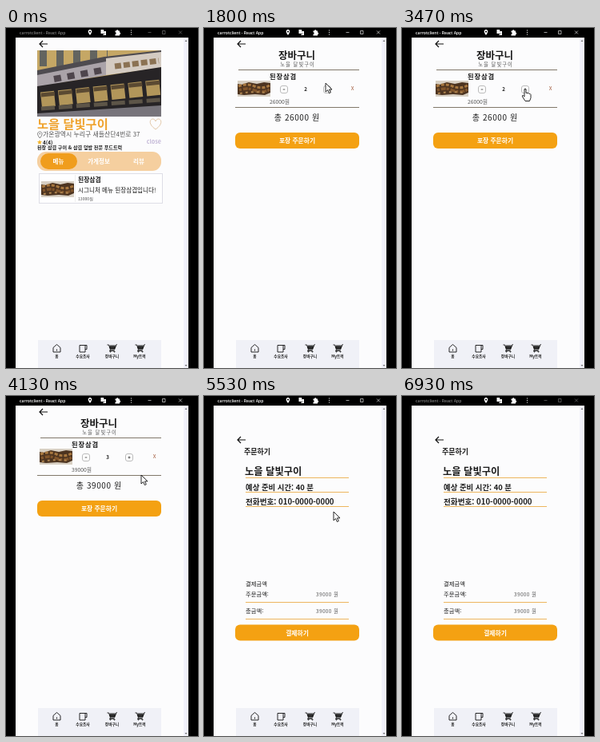
Recreate the animation shown at these times as an HTML page. Size 240x426 px, loop 6990 ms.

```html
<!DOCTYPE html>
<html lang="ko">
<head>
<meta charset="utf-8">
<title>Order demo</title>
<style>
html, body { margin: 0; width: 100%; height: 100%; overflow: hidden; background: #000; }
svg { display: block; width: 100%; height: 100%; }
text { font-family: "Noto Sans CJK KR", "Noto Sans CJK", sans-serif; fill: #1c1c1c; }
.b { font-weight: 700; }
.h { font-weight: 900; fill: #fff; }
.c { text-anchor: middle; }
.thin { font-weight: 300; fill: #555; }
.line { fill: none; stroke: #111; stroke-width: .9; }
.rule { stroke: #edb65e; stroke-width: 1; }
</style>
</head>
<body>
<svg viewBox="0 0 240 426">
  <defs>
    <path id="back" d="M52 20H42m4-4-4 4 4 4" fill="none" stroke="#111" stroke-width="1.200"/>
    <g id="food">
      <path fill="#4d3420" d="M0 0h41v20H0z"/>
      <path fill="#d8d0c4" d="M0 0h41v3l-8-1-9 2-10-2-9 3-5-1zM0 17l8 1 14-1 12 1 7-3v5H0z"/>
      <path d="M1 7q10-4 20 0t19-1" fill="none" stroke="#a87840" stroke-width="3" stroke-dasharray="4 2"/>
      <path d="M2 12q9-4 19 0t19-1" fill="none" stroke="#81552b" stroke-width="3.500" stroke-dasharray="3 2 6 1"/>
      <path d="M3 16q12-3 34-1" fill="none" stroke="#b08550" stroke-width="2" stroke-dasharray="3 4"/>
    </g>
    <g id="cart" class="line">
      <path d="M-5-4h2l2 6h5l2-5h-8"/>
      <path d="M-2-2h7l-1 3h-5z" fill="#333"/>
      <path d="m6-3 1-2M-1 2l-1 1.500h6"/>
      <circle cx="-1" cy="4.500" r=".6"/><circle cx="4" cy="4.500" r=".6"/>
    </g>
  </defs>

  <path d="M0 0h240v426H0z"/>
  <path fill="#fcfcfd" d="M12 12h216v414H12z"/>
  <path fill="#f1f1fa" d="M222 12h6v414h-6z"/>
  <path fill="#777" d="m223.500 17 1.500-2 1.500 2zm0 405 1.500 2 1.500-2z"/>

  <g id="bar">
    <text x="17" y="7.800" font-size="5.100" style="font-family:'Open Sans',sans-serif;font-weight:600;fill:#fff">carrotclient - React App</text>
    <path d="M177.500 5.500h4m14-2h3.500v4h-3.500zm20.500 0 4 4m0-4-4 4" fill="none" stroke="#ddd" stroke-width=".7"/>
  </g>
  <g fill="#fff">
    <path d="M105 9c-4-5-2-7 0-7s4 2 0 7zm0-5.500a1 1 0 1 0 .1 0z" fill-rule="evenodd"/>
    <path d="M118.500 2h3.500l1 5h-4.500zM122.500 4h2.500v5h-4l1-1.500h1.500z"/>
    <path d="M136.500 3.500h1.500a1.200 1.200 0 0 1 2.400 0h1.600v2a1.200 1.200 0 0 1 0 2.400v1.600h-5.500v-1.800a1.200 1.200 0 0 0 0-2.400z"/>
    <path d="M156 2.500h1v1h-1zm0 2.500h1v1h-1zm0 2.500h1v1h-1z"/>
  </g>

  <g class="page">
    <use href="#back"/>
    <svg x="39" y="28" width="155" height="83" viewBox="0 0 155 83">
      <path fill="#c5a765" d="M0 0h155v83H0z"/>
      <path d="M3 10h85" stroke="#63645f" stroke-width="20" stroke-dasharray="9 12"/>
      <path fill="#4e4b50" d="m0 25 84-17 71-8v6L86 20 0 34z"/>
      <path fill="#aaa3a9" d="m0 31 86-17v17L0 46z"/>
      <path fill="#d4cbc2" d="m86 10 69-8v20l-69 9z"/>
      <path d="m21 36 65-12" stroke="#4e454c" stroke-width="8" stroke-dasharray="9 8"/>
      <path d="m97 20 55-7" stroke="#8b7253" stroke-width="7" stroke-dasharray="8 3"/>
      <path fill="#272426" d="m0 45 155-24v50L0 80z"/>
      <path d="m5 62 150-16" stroke="#b2965a" stroke-width="19" stroke-dasharray="17 5"/>
      <path d="m5 56 150-16" stroke="#5b4a32" stroke-width="5" stroke-dasharray="17 5"/>
      <path d="m5 73 150-11" stroke="#5d5548" stroke-width="5" stroke-dasharray="17 5"/>
      <path fill="#77747b" d="m0 79 155-10v14H0z"/>
    </svg>
    <text class="h" x="39" y="126" font-size="15.300" style="fill:#efa32e">노을 달빛구이</text>
    <path d="M187 127c-10-7-7-13-3.500-13 2 0 3 1.500 3.500 3 .5-1.500 1.500-3 3.500-3 3.500 0 6.500 6-3.500 13z" fill="none" stroke="#e3c9aa"/>
    <path d="M42.300 138c-5-6-2-8 0-8s5 2 0 8z" fill="none" stroke="#666" stroke-width=".8"/>
    <circle cx="42.300" cy="132.500" r=".8" fill="#666"/>
    <text x="46" y="136.300" font-size="7.900" style="fill:#555;font-weight:500">가온광역시 누리구 새들산단4번로 37</text>
    <path fill="#f4b52d" d="m42 140 .9 2 2.100.2-1.600 1.500.5 2.200-1.900-1.100-1.900 1.100.5-2.200-1.600-1.500 2.100-.2z"/>
    <text class="b" x="46" y="145.500" font-size="6.400">4(4)</text>
    <text class="b" x="194" y="145" font-size="7.200" text-anchor="end" style="fill:#c5b9d8">close</text>
    <text class="b" x="39" y="152.300" font-size="6.100">된장 삼겹 구이 &amp; 삼겹 덮밥 전문 푸드트럭</text>
    <rect x="39" y="155" width="155" height="24" rx="11" fill="#f5cf9f"/>
    <rect x="43" y="157" width="46" height="20" rx="10" fill="#f09d1c"/>
    <g class="c" font-size="7.500">
      <text class="h" x="65.500" y="169.500">메뉴</text>
      <text class="h" x="116" y="169.500">가게정보</text>
      <text class="h" x="166" y="169.500">리뷰</text>
    </g>
    <rect x="41.500" y="182.500" width="154" height="37" fill="#fefeff" stroke="#dedee6"/>
    <use href="#food" x="44" y="192"/>
    <path d="M86.500 184v34" stroke="#eee"/>
    <text class="b" x="90" y="192.500" font-size="7.800">된장삼겹</text>
    <text x="90" y="205.500" font-size="7.600" style="font-weight:500">시그니처 메뉴 된장삼겹입니다!</text>
    <text class="thin" x="90" y="215.500" font-size="5.100">13000원</text>
  </g>

  <g class="page">
    <use href="#back"/>
    <text class="h c" x="116" y="39" font-size="12.500" style="fill:#1c1c1c">장바구니</text>
    <text class="c" x="117" y="47.500" font-size="6.300" letter-spacing="1" style="fill:#555">노을 달빛구이</text>
    <path d="M43 52.500h151M39 99.500h155" stroke="#81786a"/>
    <use href="#food" x="42" y="66"/>
    <text class="b" x="82" y="64" font-size="8.300" letter-spacing=".9">된장삼겹</text>
    <g fill="#fff" stroke="#aaa" stroke-width=".8">
      <rect x="95.500" y="72.500" width="9" height="9" rx="2.500"/>
      <rect x="149.500" y="72.500" width="9" height="9" rx="2.500"/>
    </g>
    <path d="M98.700 77h2.600m51.200 0h3m-1.500-1.500v3" stroke="#333" stroke-width=".8"/>
    <text id="qty" class="b c" x="127" y="79.200" font-size="6.200"></text>
    <text class="c" x="185.500" y="78" font-size="6.500" style="fill:#a1583a">X</text>
    <text id="price" class="thin" x="82" y="95" font-size="6.800"></text>
    <text id="total" class="c" x="116.300" y="115.500" font-size="10" letter-spacing=".6"></text>
    <rect x="39" y="131" width="155" height="20" rx="6" fill="#f4a112"/>
    <text class="h c" x="116.500" y="144" font-size="7.800">포장 주문하기</text>
  </g>

  <g class="page">
    <use href="#back" y="35"/>
    <text class="b" x="50" y="73" font-size="9">주문하기</text>
    <text class="h" x="51" y="99" font-size="12.300" style="fill:#1c1c1c">노을 달빛구이</text>
    <text class="b" x="52" y="117.500" font-size="9.400">예상 준비 시간: 40 분</text>
    <text class="b" x="52" y="135.500" font-size="9.600">전화번호: 010-0000-0000</text>
    <path class="rule" d="M52 102.500h129M52 120.500h129M52 138.500h129M52 258.500h129M52 279.500h129"/>
    <g font-size="7.300">
      <text x="52" y="237.500">결제금액</text>
      <text x="52" y="250.500">주문금액:</text>
      <text x="52" y="271.500">총금액:</text>
    </g>
    <g font-size="6.400" letter-spacing=".4">
      <text class="thin" x="140" y="250.500">39000 원</text>
      <text class="thin" x="140" y="271.500">39000 원</text>
    </g>
    <rect x="39" y="286.500" width="155" height="20" rx="6" fill="#f4a112"/>
    <text class="h c" x="116.500" y="299.500" font-size="7.800">결제하기</text>
  </g>

  <path fill="#f0f1f7" d="M40 391h154v35H40z"/>
  <path class="line" d="m59 400.500 4.500-4 4.500 4v5.500h-9zm4.500 2v2M92 397.500h7v8.500h-7zm7 0h2v5h-2"/>
  <use href="#cart" x="131.500" y="401"/>
  <use href="#cart" x="166.500" y="401"/>
  <g class="b c" font-size="4.700">
    <text x="63.500" y="413">홈</text>
    <text x="96" y="413">수요조사</text>
    <text x="132.500" y="413">장바구니</text>
    <text x="167" y="413">My트럭</text>
  </g>

  <g id="cursor" fill="#fff" stroke="#111" stroke-width=".9" stroke-linejoin="round">
    <path id="arrow" d="M0 0v11l2.600-2.400 1.800 4 1.900-.9-1.800-3.800h3.500z"/>
    <path id="hand" d="M-1 0q1-1.500 2 0v4.500l1-.5 1 .8 1.200-.3.800 1 1.200 0 .8 1v4l-1.500 4h-5.500l-3.500-5.500q-.5-2 1-1.500l1.500 1.500z"/>
  </g>
</svg>
<script>
const LOOP = 6990, STEP = 1000 / 15, PRICE = 13000;
const $ = id => document.getElementById(id);
const pages = document.querySelectorAll('.page');

// time, x, y of the pointer
const route = [
  [950, 150, 430], [1130, 130, 202], [1200, 130, 202], [1370, 132, 403], [1470, 132, 403],
  [1790, 152, 69], [1930, 154, 77], [2130, 154, 77], [2600, 102, 78], [2980, 102, 78],
  [3330, 154, 77], [3570, 154, 77], [4000, 169, 99], [4200, 169, 99], [4450, 125, 142],
  [4660, 125, 142], [5130, 162, 145], [5750, 162, 145], [6350, 176, 430]
];

// boxes that show the hand: x1, y1, x2, y2
const links = [
  [[41, 182, 196, 220]],
  [[95, 72, 105, 82], [149, 72, 159, 82], [39, 131, 194, 151]],
  [[39, 286, 194, 307]]
];
const nav = [40, 391, 194, 426];

function pointer(t) {
  const i = route.findIndex(k => k[0] > t);
  if (i < 1) return [0, 440];
  const [t0, x0, y0] = route[i - 1], [t1, x1, y1] = route[i];
  const u = (t - t0) / (t1 - t0), e = u * u * (3 - 2 * u);
  return [x0 + (x1 - x0) * e, y0 + (y1 - y0) * e];
}

function draw(now) {
  const t = Math.floor(now % LOOP / STEP + 0.05) * STEP;
  const page = t < 1450 ? 0 : t < 4600 ? 1 : 2;
  pages.forEach((p, i) => p.style.display = i === page ? '' : 'none');

  const qty = t < 2050 || t >= 2930 && t < 3480 ? 2 : 3;
  $('qty').textContent = qty;
  $('price').textContent = qty * PRICE + '원';
  $('total').textContent = `총 ${qty * PRICE} 원`;
  $('bar').setAttribute('opacity', t < 400 || t > 6600 ? 0.5 : 1);

  const [x, y] = pointer(t);
  const over = [...links[page], nav].some(([a, b, c, d]) => x >= a && x <= c && y >= b && y <= d);
  $('cursor').setAttribute('transform', `translate(${x} ${y})`);
  $('arrow').style.display = over ? 'none' : '';
  $('hand').style.display = over ? '' : 'none';
}

let start;
function tick(now) {
  start ??= now;
  draw(now - start);
  requestAnimationFrame(tick);
}
draw(0);
requestAnimationFrame(tick);
</script>
</body>
</html>
```
